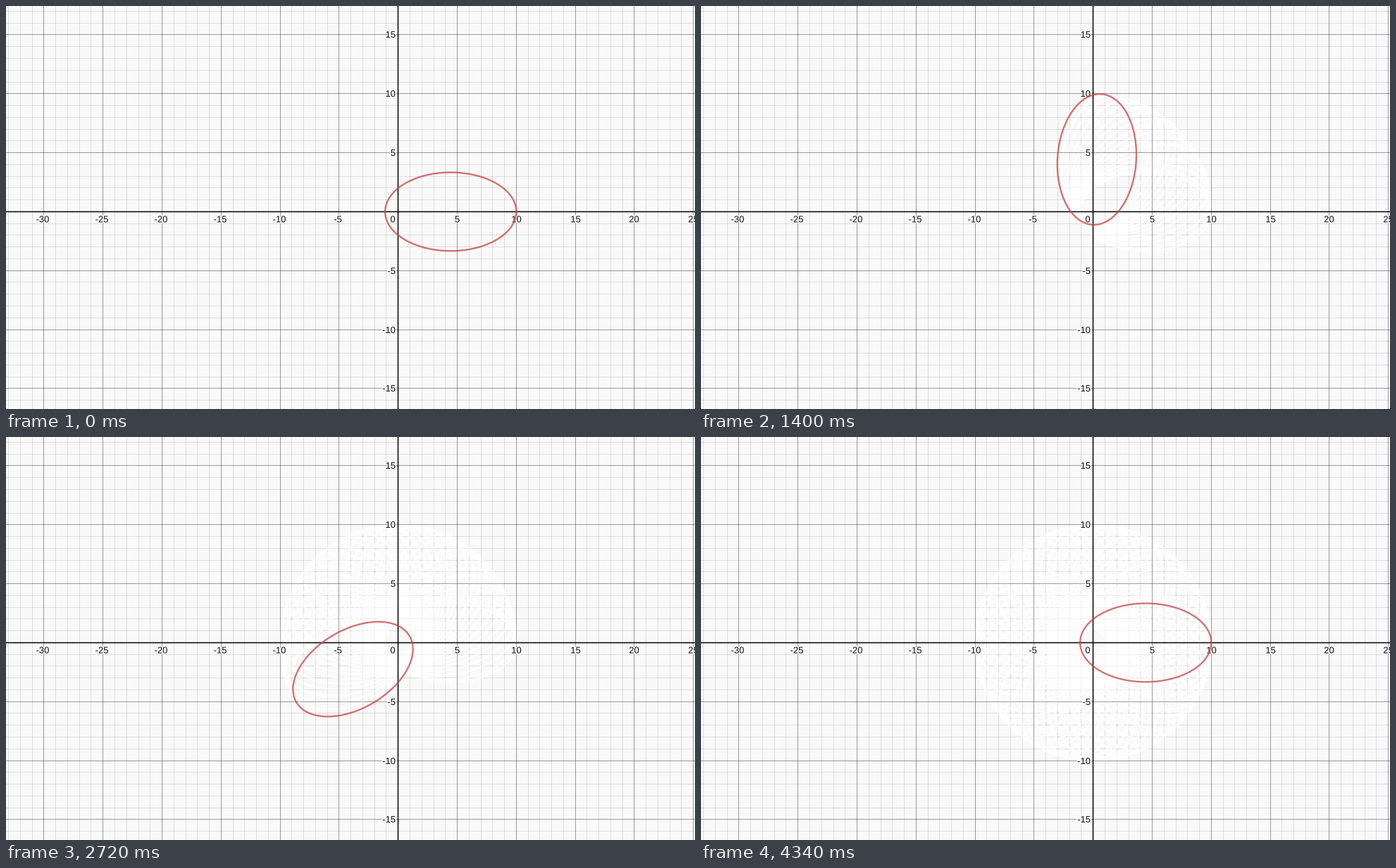
A matplotlib script for the animation above (8 s loop, 978x573 px).

```python
import numpy as np
import matplotlib.pyplot as plt
from matplotlib.animation import FuncAnimation
from matplotlib.collections import LineCollection
from matplotlib.patheffects import withStroke

W, H, DPI = 978, 573, 96
TICK, LOOP = 20, 8000            # ms
HOLD, STEP, STEPS = 500, 60, 65  # first pause, time per turn step, turn steps
X0, Y0, UNIT = 556.75, 292.4, 16.76
PAPER = "#f9f9f9"


def px(n):
    """Pixels to points."""
    return n * 72 / DPI


fig = plt.figure(figsize=(W / DPI, H / DPI), dpi=DPI, facecolor=PAPER)
ax = fig.add_axes([0, 0, 1, 1])
ax.set_xlim(0, W)
ax.set_ylim(H, 0)
ax.axis("off")


def crisp(v):
    return np.floor(v) + 0.5


def col(n):
    return crisp(X0 + n * UNIT)


def row(n):
    return crisp(Y0 - n * UNIT)


def lines(xs, ys, width, color, alpha, z):
    segs = [[(col(n), 0), (col(n), H)] for n in xs]
    segs += [[(0, row(n)), (W, row(n))] for n in ys]
    ax.add_collection(LineCollection(segs, linewidths=px(width), colors=color,
                                     alpha=alpha, zorder=z, snap=False))


minor_x = [n for n in range(-33, 26) if n % 5]
minor_y = [n for n in range(-16, 18) if n % 5]
major_x = [n for n in range(-30, 26, 5) if n]
major_y = [n for n in range(-15, 16, 5) if n]

# The fine grid is split so that the pale trail only half covers it.
lines(minor_x, minor_y, 1, "black", 0.06, 1)
lines(minor_x, minor_y, 1, "black", 0.05, 3)
lines(major_x, major_y, 1, "black", 0.38, 4)
lines([0], [0], 1.6, "black", 0.95, 5)


def label(x, y, text, align):
    ax.text(x, y, text, ha=align, va="baseline", color="#111111",
            fontname="Liberation Sans", fontsize=px(13), zorder=6,
            path_effects=[withStroke(linewidth=px(3), foreground=PAPER)])


for n in major_x:
    label(col(n) - (1.5 if n < 0 else 0), 307.5, str(n), "center")
for n in major_y:
    label(553, row(n) + 4.5, str(n), "right")
label(549, 307.5, "0", "center")

# Turn of the ellipse in degrees at a few steps, with short first and last steps.
KEY_STEPS = [0, 1, 24, 28, 38, 46, 57, 64, 65]
KEY_TURNS = [0, 2.9, 130.4, 153.3, 210.4, 258.8, 318.7, 357.5, 360]
theta = np.linspace(0, 2 * np.pi, 161)


def ellipse(step):
    """Conic r = 2 / (1 - 0.8 cos t) turned about its focus at the origin."""
    turn = np.radians(np.interp(step, KEY_STEPS, KEY_TURNS))
    x = 4 / 0.9 + 5 / 0.9 * np.cos(theta)
    y = 3 / 0.9 * np.sin(theta)
    c, s = np.cos(turn), np.sin(turn)
    return X0 + UNIT * (x * c - y * s), Y0 - UNIT * (x * s + y * c)


curves = [np.array(ellipse(k)) for k in range(STEPS + 1)]
gap = np.full((2, 1), np.nan)
trails = np.hstack([np.hstack([c, gap]) for c in curves])
span = len(theta) + 1

trail, = ax.plot([], [], color="white", lw=px(3.2), zorder=2)
curve, = ax.plot([], [], color="#c74440", alpha=0.76, lw=px(2.3), zorder=7,
                 solid_joinstyle="round")


def draw(i):
    t = i * TICK
    step = 0 if t < HOLD else min((t - HOLD) // STEP + 1, STEPS)
    trail.set_data(*trails[:, :step * span])
    curve.set_data(*curves[step])
    return trail, curve


anim = FuncAnimation(fig, draw, frames=LOOP // TICK, interval=TICK,
                     repeat=True, repeat_delay=0, cache_frame_data=False)
plt.show()
```
